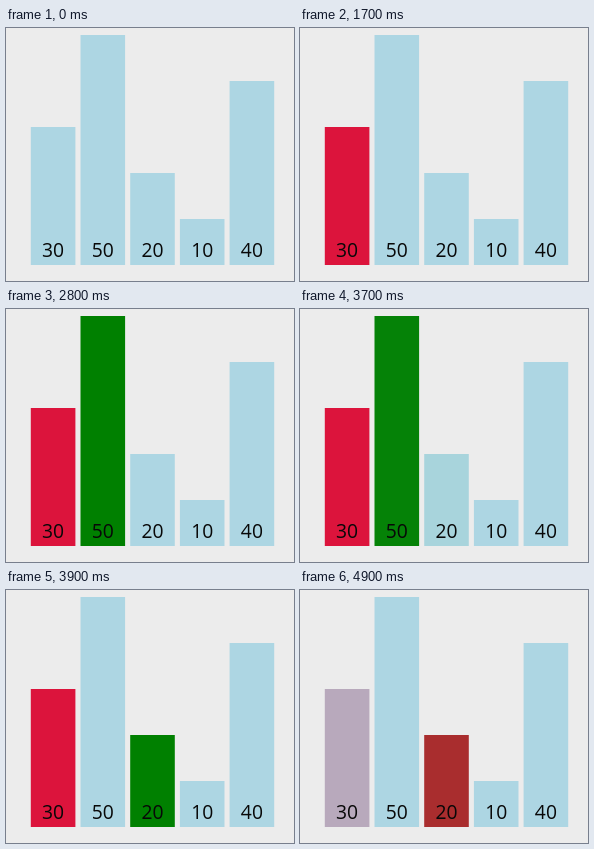
An HTML page for the animation above (5 s loop, 288 px wide and 253 px high).

```html
<!DOCTYPE html>
<html lang="en">
<head>
<meta charset="utf-8">
<style>
  html, body { margin: 0; width: 100%; height: 100%; overflow: hidden; background: #ececec; }
  svg { display: block; width: 100vw; height: 100vh; }
  text { font: 19.3px "Open Sans", "Noto Sans", sans-serif; text-anchor: middle; fill: #080808; }
</style>
</head>
<body>
<svg id="stage" viewBox="0 0 288 253"></svg>
<script>
const LOOP = 5000, STEP = 100;
const BLUE = [173, 214, 227], RED = [220, 20, 60], GREEN = [0, 128, 0];
const values = [30, 50, 20, 10, 40];

// Colour transitions: bar index, start time, duration, target colour
const changes = [
  { bar: 0, start: 1380, length: 300, to: RED },
  { bar: 1, start: 2515, length: 300, to: GREEN },
  { bar: 1, start: 3690, length: 220, to: BLUE },
  { bar: 2, start: 3690, length: 220, to: GREEN },
  { bar: 0, start: 4760, length: 300, to: BLUE },
  { bar: 2, start: 4760, length: 300, to: RED },
];

function add(name, attributes) {
  const node = document.createElementNS("http://www.w3.org/2000/svg", name);
  for (const key in attributes) node.setAttribute(key, attributes[key]);
  return document.getElementById("stage").appendChild(node);
}

const bars = values.map((value, i) => {
  const x = 24.8 + 49.7 * i, width = 44.6, height = value * 4.6;
  const bar = add("rect", { x, y: 237 - height, width, height });
  add("text", { x: x + width / 2, y: 229 }).textContent = value;
  return bar;
});

const bezier = (a, b, u) => 3 * a * u * (1 - u) ** 2 + 3 * b * u * u * (1 - u) + u ** 3;

// Same curve as the CSS "ease" keyword
function ease(t) {
  if (t <= 0 || t >= 1) return t <= 0 ? 0 : 1;
  let low = 0, high = 1;
  for (let i = 0; i < 24; i++) {
    const mid = (low + high) / 2;
    if (bezier(0.25, 0.25, mid) < t) low = mid; else high = mid;
  }
  return bezier(0.1, 1, low);
}

function render(time) {
  const now = Math.floor((time % LOOP) / STEP) * STEP;
  const colors = values.map(() => BLUE);
  for (const { bar, start, length, to } of changes) {
    const amount = ease((now - start) / length);
    colors[bar] = colors[bar].map((c, i) => c + (to[i] - c) * amount);
  }
  bars.forEach((bar, i) => bar.setAttribute("fill", `rgb(${colors[i].map(Math.round)})`));
}

const origin = performance.now();
function tick() {
  render(performance.now() - origin);
  requestAnimationFrame(tick);
}
tick();
</script>
</body>
</html>
```
